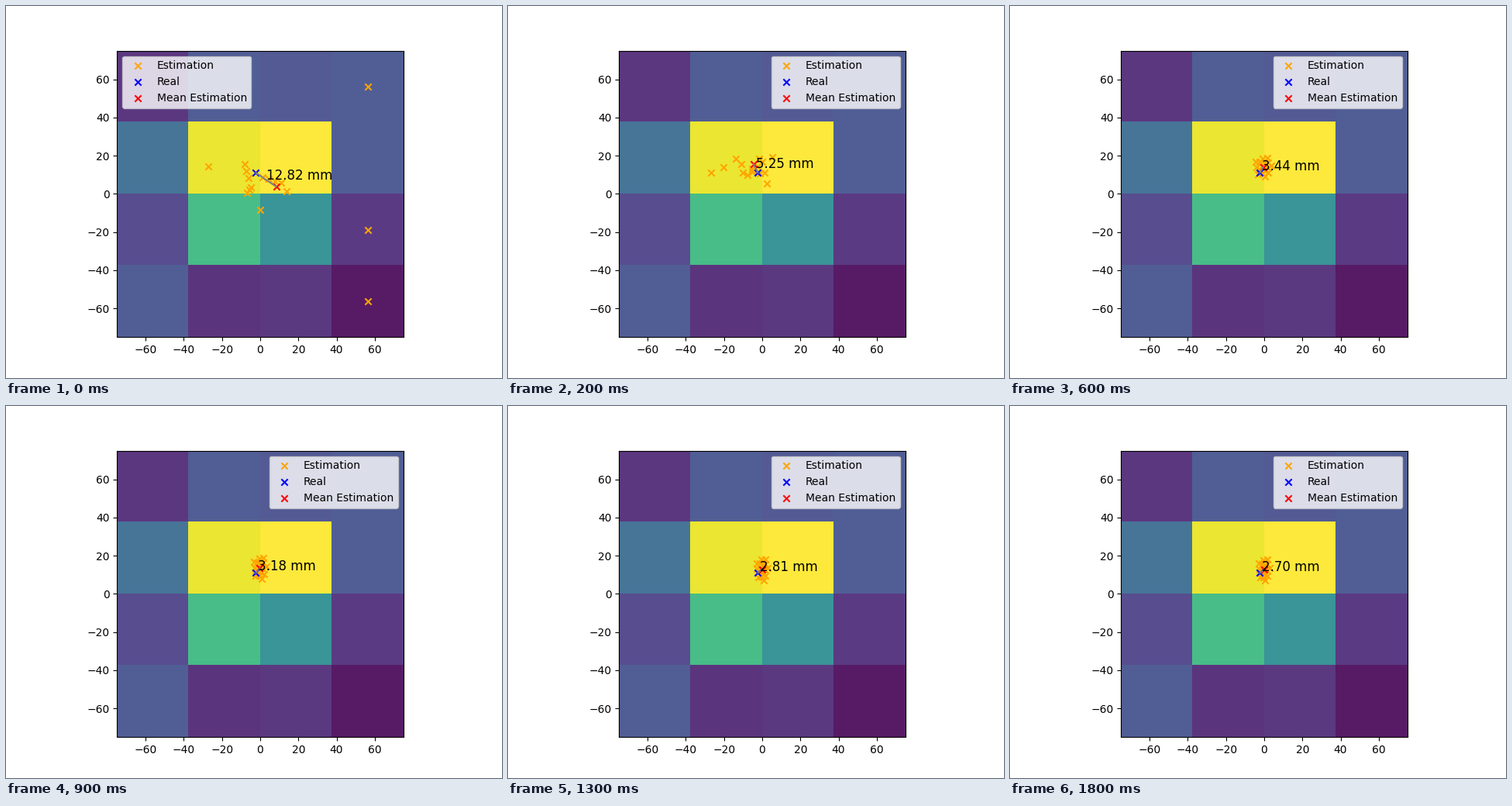
Recreate the animation shown at these times as a matplotlib script. Size 640x480 px, loop 1900 ms.

```python
import numpy as np
import matplotlib.pyplot as plt
from matplotlib.animation import FuncAnimation

FRAMES, STEP = 19, 100
HALF = 75
COUNT = 16
REAL = np.array([-2.25, 11.0])

GRID = [
    [0.088, 0.226, 0.212, 0.232],
    [0.328, 0.965, 1.000, 0.232],
    [0.165, 0.662, 0.473, 0.102],
    [0.228, 0.080, 0.095, 0.000],
]

# Key steps of the mean's path around the real spot.
STEPS = [0, 1, 4, 6, 9, 13, 18]
DISTANCE = [12.82, 5.61, 4.53, 3.44, 3.18, 2.81, 2.70]
BEARING = [-34.2, 162, 25, 61, 50, 42, 39]

GOLDEN = 137.508
PHASE = 158.4


def strokes(*rows):
    """Evenly spaced points along short lines: (start, end, count)."""
    return np.vstack([np.linspace(a, b, n) for a, b, n in rows])


FIRST = strokes(((-8.3, 15.4), (-6, 8.4), 3), ((-6.7, 0.6), (-4.7, 3.6), 3),
                ((1.3, 8.7), (10.8, 5.8), 4), ((14, 1.2), (0.2, -8.2), 2),
                ((-27, 14.2), (56.25, 56.25), 2),
                ((56.25, -18.75), (56.25, -56.25), 2))
WIDE = strokes(((-37.7, 8.5), (-18.9, 18.6), 3), ((-13.2, 16.3), (-7, 12), 2),
               ((-12, 7.8), (-1, 9.8), 5), ((0, 17.5), (7.5, 20.4), 3),
               ((6.3, 7.3), (5.1, 2.8), 2), ((-2.6, 11.8), (-2.6, 11.8), 1))


def mean_at(i):
    dist = np.interp(i, STEPS, DISTANCE)
    a = np.radians(np.interp(i, STEPS, BEARING))
    return REAL + dist * np.array([np.cos(a), np.sin(a)])


def cluster(i, mean):
    """Golden-angle spiral in an ellipse that narrows over time."""
    k = np.arange(COUNT)
    r = np.sqrt((k + 0.5) / COUNT)
    a = np.radians(PHASE + GOLDEN * k)
    width = np.interp(i, [4, 9, 18], [5.8, 3.8, 3.3])
    height = np.interp(i, [4, 9], [5.0, 6.2])
    return mean + np.column_stack([width * r * np.cos(a),
                                   height * r * np.sin(a)])


def estimates(i, mean):
    if i == 0:
        return FIRST
    t = min((i - 1) / 3, 1)
    return WIDE * (1 - t) + cluster(i, mean) * t


fig, ax = plt.subplots(figsize=(6.4, 4.8), dpi=100)
ax.imshow(GRID, extent=(-HALF, HALF, -HALF, HALF), cmap="viridis",
          vmin=0, vmax=1, alpha=0.9)
guesses = ax.scatter([], [], marker="x", color="orange", label="Estimation")
ax.scatter(*REAL, marker="x", color="blue", label="Real")
centre = ax.scatter([], [], marker="x", color="red", label="Mean Estimation")
link, = ax.plot([], [], color="gray")
label = ax.text(0, 0, "", fontsize=12)
legend = ax.legend(loc="upper left")
ax.set_xlim(-HALF, HALF)
ax.set_ylim(-HALF, HALF)


def update(i):
    mean = mean_at(i)
    guesses.set_offsets(estimates(i, mean))
    centre.set_offsets([mean])
    link.set_data(*zip(REAL, mean))
    label.set_position((REAL + mean) / 2)
    label.set_text(f"{np.hypot(*(mean - REAL)):.2f} mm")
    legend.set_loc("upper left" if i == 0 else "upper right")
    return guesses, centre, link, label, legend


anim = FuncAnimation(fig, update, frames=FRAMES, interval=STEP,
                     repeat=True, repeat_delay=0)
plt.show()
```
